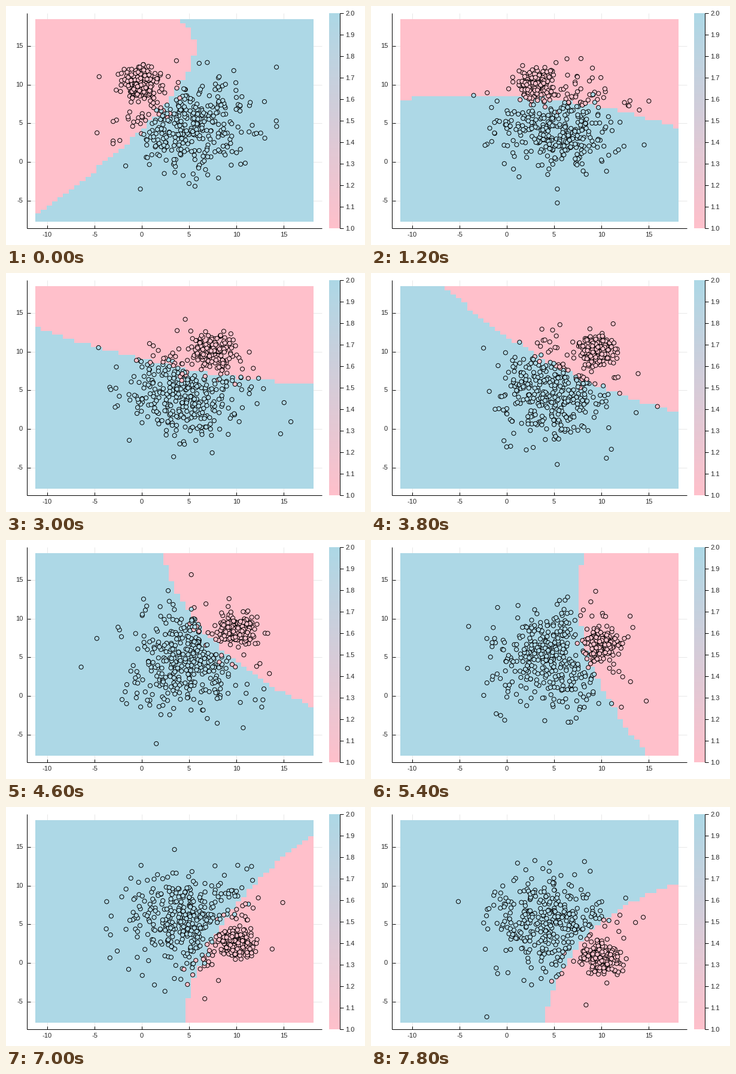
A matplotlib script for the animation above (8 s loop, 600 by 400 pixels).

```python
import numpy as np
import matplotlib.pyplot as plt
from matplotlib.animation import FuncAnimation
from matplotlib.colors import LinearSegmentedColormap, to_rgba
from matplotlib.path import Path

W, H, DPI = 600, 400, 100
PX = 72 / DPI                       # one pixel in points
FRAMES, STEP = 40, 200
LEFT, RIGHT, TOP, BOTTOM = 49, 514, 22, 361
CELLS = 50
ORIGIN, SCALE = np.array([227, 260]), np.array([15.81, -12.94])
PINK, BLUE = to_rgba("pink"), to_rgba("lightblue")
CMAP = LinearSegmentedColormap.from_list("classes", [PINK, BLUE])

# Corners clockwise from bottom left, and how far along the rim each one lies
CORNERS = np.array([(LEFT, BOTTOM), (LEFT, TOP), (RIGHT, TOP),
                    (RIGHT, BOTTOM), (LEFT, BOTTOM)], float)
RIM = np.append(0, np.cumsum(np.hypot(*np.diff(CORNERS, axis=0).T)))

# The boundary is a quadratic curve between two points that walk the rim
KEYS = [0, 6, 11, 15, 23, 32, 39]
START = [12, 204, 249, 271, 551, 763, 911]
END = [581, 987, 873, 967, 1062, 1356, 1367]
BEND_X = [395, 280, 330, 300, 305, 325, 318]
BEND_Y = [105, 125, 210, 180, 188, 177, 187]


def to_px(pts):
    return pts * SCALE + ORIGIN


def rim_point(s):
    return np.array([np.interp(s, RIM, CORNERS[:, k]) for k in (0, 1)])


def pink_side(i):
    """Outline of the pink region: the curve, closed clockwise by the rim."""
    start, end, bx, by = (np.interp(i, KEYS, row)
                          for row in (START, END, BEND_X, BEND_Y))
    a, b, bend = rim_point(start), rim_point(end), np.array([bx, by])
    t = np.linspace(0, 1, 60)[:, None]
    curve = (1 - t) ** 2 * b + 2 * t * (1 - t) * bend + t ** 2 * a
    between = CORNERS[(RIM > start) & (RIM < end)]
    return Path(np.vstack([curve, between]))


def cell_centres():
    mid = (np.arange(CELLS) + 0.5) / CELLS
    xs = LEFT + mid * (RIGHT - LEFT)
    ys = TOP + mid * (BOTTOM - TOP)
    return np.column_stack([g.ravel() for g in np.meshgrid(xs, ys)])


CENTRES = cell_centres()


def centre_at(i):
    """The small cluster drifts right, then turns down."""
    return np.array([min(i, 20) * 0.5, 10 - max(i - 20, 0) * 0.5])


def samples(i, pink):
    """A fresh batch: a tight pink cluster and a wide cloud that avoids it."""
    rng = np.random.default_rng(40 + i)
    c = centre_at(i)
    tight = to_px(c + rng.normal(0, 1, (190, 2)))

    cloud = rng.normal(5, 3.15, (480, 2))
    gap = np.hypot(*(cloud - c).T)
    keep = (gap > 3.6) | (rng.random(len(cloud)) < 0.22)
    cloud = to_px(cloud[keep][:360])
    blurred = cloud + rng.normal(0, 9, cloud.shape)

    pts = np.vstack([tight, cloud])
    blue = np.append(np.zeros(len(tight), bool), ~pink.contains_points(blurred))
    order = rng.permutation(len(pts))
    return pts[order], blue[order]


fig = plt.figure(figsize=(W / DPI, H / DPI), dpi=DPI, facecolor="white")
ax = fig.add_axes([0, 0, 1, 1])
ax.axis("off")


def line(xs, ys, color="black", z=4):
    ax.plot(xs, ys, color=color, lw=PX, zorder=z, solid_capstyle="butt")


def label(x, y, s, ha):
    ax.text(x, y, s, ha=ha, va="center_baseline", color="#262626",
            family="Liberation Sans", size=8)


for v in range(-10, 16, 5):
    x = ORIGIN[0] + v * SCALE[0]
    line([x, x], [12, 372], "#e8e8e8", 0)
    line([x, x], [367, 372])
    label(x, 381.5, str(v), "center")
for v in range(-5, 16, 5):
    y = ORIGIN[1] + v * SCALE[1]
    line([36, 528], [y + 1, y + 1], "#e8e8e8", 0)
    line([36, 41], [y + 1, y + 1])
    label(28, y, str(v), "right")
line([35, 35], [12, 372])
line([35, 528], [372, 372])

ramp = np.linspace(1, 0, 256)[:, None]
ax.imshow(ramp, cmap=CMAP, extent=(540, 558, 372, 12), aspect="auto", zorder=1)
line([558, 558], [12, 372])
for k in range(11):
    y = 372 - 36 * k
    line([558, 564], [y, y])
    label(567.5, y - 0.5, f"{1 + k / 10:.1f}", "left")

region = ax.imshow(np.zeros((CELLS, CELLS)), cmap=CMAP, vmin=0, vmax=1,
                   extent=(LEFT, RIGHT, BOTTOM, TOP), aspect="auto",
                   interpolation="nearest", zorder=1)
dots = ax.scatter([], [], s=(7 * PX) ** 2, edgecolors="black",
                  linewidths=PX, zorder=3)
ax.set_xlim(0, W)
ax.set_ylim(H, 0)


def draw(i):
    pink = pink_side(i)
    blue_cells = ~pink.contains_points(CENTRES)
    region.set_data(blue_cells.reshape(CELLS, CELLS).astype(float))
    pts, blue = samples(i, pink)
    dots.set_offsets(pts)
    dots.set_facecolors(np.where(blue[:, None], BLUE, PINK))
    return region, dots


anim = FuncAnimation(fig, draw, frames=FRAMES, interval=STEP,
                     repeat=True, repeat_delay=0, blit=False)
plt.show()
```
